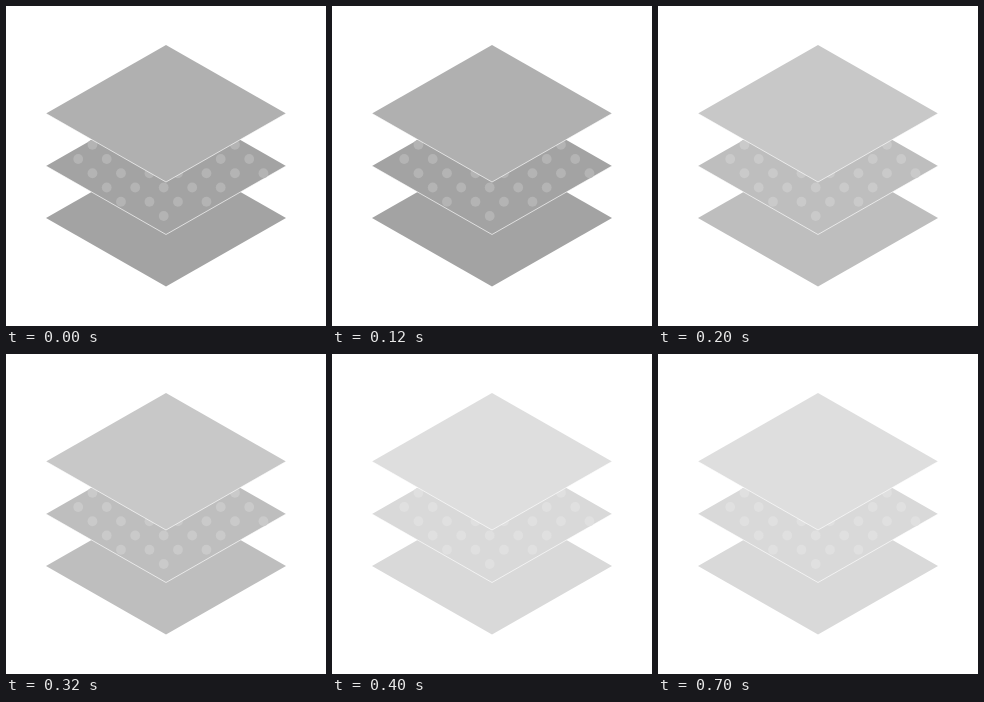
Write an HTML page that moves like this. It is 320 px wide and 320 px high and loops after 900 ms.

```html
<!DOCTYPE html>
<html lang="en">
<head>
<meta charset="utf-8">
<title>Layers</title>
<style>
  html, body { margin: 0; width: 100%; height: 100%; overflow: hidden; background: #fff; }
  svg { display: block; width: 100%; height: 100%; }
  .seam { fill: none; stroke: #fff; stroke-width: 1; stroke-opacity: .65; }
</style>
</head>
<body>
<svg viewBox="0 0 320 320">
  <g id="bottom"></g>
  <g id="middle"></g>
  <g id="top"></g>
</svg>
<script>
const LOOP = 900;
const CX = 160, HALF_W = 120, HALF_H = 68.5;
const MIDDLE_Y = 160;
const STEPS = [
  { until: 200, top: '#b0b0b0', middle: '#a3a3a3', bottom: '#a3a3a3', dots: '#b4b4b4' },
  { until: 400, top: '#c8c8c8', middle: '#bebebe', bottom: '#bebebe', dots: '#cacaca' },
  { until: LOOP, top: '#dedede', middle: '#d9d9d9', bottom: '#d9d9d9', dots: '#e0e0e0' }
];

function add(parent, tag, attrs) {
  const node = document.createElementNS('http://www.w3.org/2000/svg', tag);
  for (const key in attrs) node.setAttribute(key, attrs[key]);
  return parent.appendChild(node);
}

function addLayer(id, cy, hasSeam) {
  const group = document.getElementById(id);
  const left = `${CX - HALF_W},${cy}`, right = `${CX + HALF_W},${cy}`;
  const bottom = `${CX},${cy + HALF_H}`;
  const shape = add(group, 'polygon', { points: `${left} ${CX},${cy - HALF_H} ${right} ${bottom}` });
  if (hasSeam) add(group, 'polyline', { points: `${left} ${bottom} ${right}`, class: 'seam' });
  return shape;
}

// Staggered dots that lie well inside the middle layer.
function addDots() {
  const group = add(document.getElementById('middle'), 'g', {});
  const pitch = 14.25;
  for (let row = -1; row <= 4; row++) {
    for (let col = -7; col <= 7; col++) {
      if ((row + col) % 2) continue;
      const x = 157.7 + col * pitch, y = 153 + row * pitch;
      const reach = Math.abs(x - CX) / HALF_W + Math.abs(y - MIDDLE_Y) / HALF_H;
      if (reach < .937) add(group, 'circle', { cx: x, cy: y, r: 4.9 });
    }
  }
  return group;
}

const parts = {
  bottom: addLayer('bottom', 212, false),
  middle: addLayer('middle', MIDDLE_Y, true),
  top: addLayer('top', 107.5, true),
  dots: addDots()
};

function draw(ms) {
  const step = STEPS.find(s => ms % LOOP < s.until);
  for (const name in parts) parts[name].setAttribute('fill', step[name]);
}

const start = performance.now();
function tick() {
  draw(performance.now() - start);
  requestAnimationFrame(tick);
}
tick();
</script>
</body>
</html>
```
